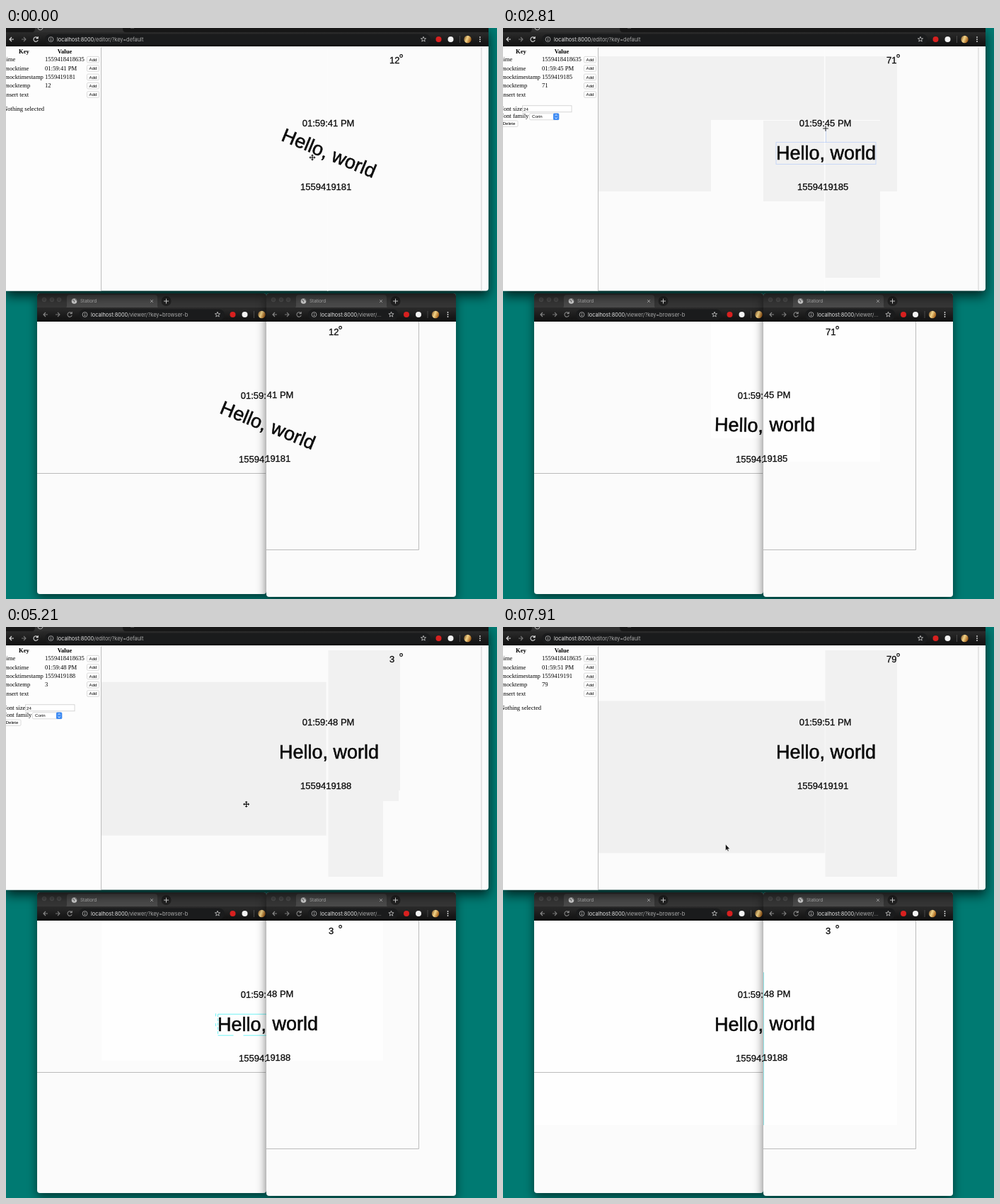
An HTML page that plays this animation: 694 by 807 pixels, repeating every 8 s.

```html
<!DOCTYPE html>
<html lang="en">
<head>
<meta charset="utf-8">
<title>Display editor</title>
<style>
  html, body { margin: 0; width: 100%; height: 100%; overflow: hidden; background: #007a72; }
  svg { display: block; width: 100%; height: 100%; }
  text { white-space: pre; }
  .ui { font-family: Inter, sans-serif; }
  .page { font: 8.6px "Liberation Serif", serif; }
  .head { font-weight: bold; text-anchor: middle; }
  .form { font: 6.1px "Liberation Sans", sans-serif; }
  .label, .title { font: 13px "Liberation Sans", sans-serif; fill: #0a0a0a; stroke: #0a0a0a; stroke-width: .3; }
  .title { font-size: 27px; text-anchor: middle; stroke-width: .55; }
  .window { filter: drop-shadow(0 5px 7px rgba(0, 0, 0, .55)); }
  .front { filter: drop-shadow(0 7px 8px rgba(0, 0, 0, .7)); }
  .icon { fill: none; stroke-width: 1.1; }
</style>
</head>
<body>
<svg id="stage" viewBox="0 0 694 807"></svg>
<script>
const LOOP = 8000;
const CENTER = { x: 456.5, y: 177 };
const BLUE = 'rgba(102,153,255,.5)';

// [first change, last change, number of changes]
const changes = [
  [0, 0, 1], [180, 1120, 7], [1270, 1270, 1], [1570, 2480, 7], [2660, 3100, 4],
  [3400, 3400, 1], [3700, 4170, 4], [4470, 5510, 8], [5650, 6100, 4],
  [6570, 6570, 1], [6870, 7610, 6], [7910, 7910, 1]
].flatMap(([from, to, n]) =>
  Array.from({ length: n }, (_, i) => n > 1 ? Math.round((from + (to - from) * i / (n - 1)) / 10) * 10 : from));

const cursorPath = [
  [0, 433, 183], [490, 433, 183], [960, 470, 144], [1270, 470, 144], [2180, 457.5, 142],
  [2660, 456, 142], [3400, 456, 142], [4170, 340, 202], [4620, 340, 202], [5510, 339.5, 275],
  [5650, 339.5, 275], [6570, 339.5, 277], [7610, 304, 345], [7910, 314.5, 307]
];
const titleAngle = [[0, 22.4], [1270, 22.4], [1570, 19.5], [1870, 11], [2180, 1.9], [2480, .5], [2660, 0]];
const screenTop = [[4620, 30], [5510, 102], [5650, 102], [5800, 104.5]];

// Left-over shading behind the editor canvas
const shading = [
  [0, ''],
  [340, 'M135 109.5H533V224H135Z'],
  [1870, 'M135 40H557V231H533V353H455V245H368V131H294V231H135Z'],
  [3100, 'M135 40H557V231H533V353H455V245H376V136H368V131H294V136H301V245H294V231H135Z'],
  [4470, 'M455.5 33H557V231H555V246H533V353H455.5Z'],
  [7160, 'M455.5 33H557V353H455.5Z']
];
const viewerShading = [[0, ''], [1870, 'M368 415H533V607H368Z'], [2660, 'M294 415H533V613H368V580H294Z'],
  [5060, 'M135 415H533V613H135Z'], [7160, 'M44 415H557V704H44Z']];
const editorData = [[0, 41, 12], [1870, 45, 71], [4470, 48, 3], [7160, 51, 79]];
const viewerData = [[0, 41, 12], [2660, 45, 71], [5060, 48, 3]];
const cursorKind = [[0, 'move'], [1270, 'plus'], [3700, 'move'], [7160, 'arrow']];

const held = (keys, t) => keys.filter(k => k[0] <= t).pop() || keys[0];

function tween(keys, t) {
  const next = keys.findIndex(k => k[0] > t);
  if (next < 0) return keys[keys.length - 1].slice(1);
  if (next === 0) return keys[0].slice(1);
  const a = keys[next - 1], b = keys[next], p = (t - a[0]) / (b[0] - a[0]);
  return a.slice(1).map((v, i) => v + (b[i + 1] - v) * p);
}

const rect = (x, y, w, h, fill, more = '') =>
  `<rect x="${x}" y="${y}" width="${w}" height="${h}" fill="${fill}" ${more}/>`;
const circle = (x, y, r, fill, more = '') => `<circle cx="${x}" cy="${y}" r="${r}" fill="${fill}" ${more}/>`;
const path = (d, stroke, more = '') => `<path d="${d}" fill="none" stroke="${stroke}" ${more}/>`;
const text = (x, y, str, cls, more = '') => `<text x="${x}" y="${y}" class="${cls}" ${more}>${str}</text>`;
const group = (x, y, body, angle = 0) => `<g transform="translate(${x} ${y}) rotate(${angle})">${body}</g>`;

// Address bar with its buttons; y is the middle line
function toolbar(x, y, navX, width, iconX, url, navColor, menu) {
  const arrow = (ax, dir, color) => path(`M${ax + 3 * dir} ${y}h${-6 * dir}m${3 * dir} -3l${-3 * dir} 3l${3 * dir} 3`, color, 'class="icon"');
  let star = '';
  for (let i = 0; i < 10; i++) {
    const r = i % 2 ? 1.6 : 3.8, a = i * Math.PI / 5;
    star += `${i ? 'L' : 'M'}${(iconX + r * Math.sin(a)).toFixed(2)} ${(y - r * Math.cos(a)).toFixed(2)}`;
  }
  return rect(x, y - 10, width, 20, 'url(#bar)')
    + rect(navX + 47, y - 7.5, iconX - navX - 37, 15, '#1a1b1c', 'rx="7.5"')
    + arrow(navX, 1, navColor) + arrow(navX + 17, -1, '#777')
    + path(`M${navX + 37} ${y - 1.5}a3.2 3.2 0 1 0 .2 2.6m0 -5.1v2.6h-2.6`, navColor, 'class="icon"')
    + circle(navX + 55.5, y, 3.4, 'none', 'stroke="#bbb" stroke-width=".8"')
    + path(`M${navX + 55.5} ${y - 2}v1m0 .8v2.2`, '#bbb', 'stroke-width=".9"')
    + text(navX + 64, y + 2.7, `<tspan fill="#e4e4e4">localhost:8000</tspan>${url}`, 'ui', 'font-size="7.4" fill="#aaa"')
    + path(star + 'Z', '#ccc', 'stroke-width=".8"')
    + circle(iconX + 21.5, y, 4, '#d8201f') + circle(iconX + 38.5, y, 4, '#f2f2f2')
    + path(`M${iconX + 51.5} ${y - 5}v10`, '#555', 'stroke-width=".8"')
    + circle(iconX + 62.5, y, 5.2, 'url(#photo)')
    + (menu ? [-3, 0, 3].map(d => circle(iconX + 80, y + d, .9, '#ddd')).join('') : '');
}

function outline(color, { handles = false, dash = '' } = {}) {
  const w = 70.5, h = 15.5;
  let out = rect(-w, -h, 2 * w, 2 * h, 'none', `stroke="${color}" stroke-dasharray="${dash}"`)
    + path(`M0 ${-h}V-35`, color);
  if (handles)
    for (const i of [-1, 0, 1]) for (const j of [-1, 0, 1])
      if (i || j) out += rect(i * w - 3.5, j * h - 3.5, 7, 7, 'none', `stroke="${color}"`);
  return out;
}

function canvasText([, second, temp], angle, frame = '') {
  return text(418.7, 138.5, `01:59:${second} PM`, 'label')
    + text(416, 229.2, 1559419140 + second, 'label')
    + text(542, 49.8, temp, 'label')
    + circle(558.6, 39.5, 1.9, 'none', 'stroke="#0a0a0a" stroke-width="1.1"')
    + group(CENTER.x, CENTER.y, text(0, 9, 'Hello, world', 'title') + frame, angle);
}

function viewer(t, isLeft) {
  const x = isLeft ? 44 : 368, w = isLeft ? 324 : 268, bottom = isLeft ? 800 : 804;
  const angle = t < 2660 ? 22.4 : isLeft && t < 3850 ? 1.6 : 0;
  let frame = '';
  if (t >= 1720 && t < 2660) frame = outline('#5cf0f4', { dash: '2 1' });
  else if (isLeft && t >= 4470 && t < 5800)
    frame = path('M-70 -15H0M-70 15H-48M-34 15H0', '#6ff2f4') + path('M-70 -15V15M-73 -16v5m0 9v5', '#6ff2f4', 'stroke-dasharray="4 2"');
  const tab = isLeft ? 0 : 324;
  const body = rect(x, 375, w, bottom - 375, '#fbfbfb')
    + rect(x, 375, w, 21, '#363636')
    + [54, 65, 75].map(c => circle(c + tab, 384, 2.8, '#444', 'stroke="#585858" stroke-width=".7"')).join('')
    + `<path d="M${83 + tab} 396q3 0 3 -4v-11q0 -4 4 -4h120q4 0 4 4v11q0 4 3 4z" fill="#4b4b4b"/>`
    + circle(96.5 + tab, 386, 3.8, '#d0d0d0')
    + path(`M${94 + tab} 384.5l2.5 1v2m1.5 -4.5l2 2.5`, '#666')
    + text(105 + tab, 388.4, 'Statiord', 'ui', 'font-size="6.3" fill="#b9b9b9"')
    + path(`M${204 + tab} 384l4 4m0 -4l-4 4`, '#bbb', 'stroke-width=".8"')
    + circle(226.5 + tab, 386, 7, '#222') + path(`M${223 + tab} 386h7m-3.5 -3.5v7`, '#ddd')
    + toolbar(x, 405, 56 + tab, w, isLeft ? 299 : 544.5, isLeft ? '/viewer/?key=browser-b' : '/viewer/...', '#888', !isLeft)
    + `<path d="${held(viewerShading, t)[1]}" fill="#fefefe"/>`
    + path(isLeft ? 'M44 629.5H367' : 'M583.5 415V737.5H368', '#b5b5b5', 'stroke-width=".9"')
    + (!isLeft && t >= 7310 ? path('M368.5 488V704', '#8fe3e6') : '')
    + group(isLeft ? -87 : -86, isLeft ? 385.2 : 384, canvasText(held(viewerData, t), angle, frame));
  return `<g class="window"><g clip-path="url(#${isLeft ? 'left' : 'right'})">${body}</g></g>`;
}

function sidePanel(t, [, second, temp]) {
  const rows = [['time', 1559418418635], ['mocktime', `01:59:${second} PM`],
    ['mocktimestamp', 1559419140 + second], ['mocktemp', temp], ['insert text', '']];
  const button = (x, y, w, label) => rect(x, y, w, 8.5, '#fff', 'rx="1.5" stroke="#ccc" stroke-width=".7"')
    + text(x + w / 2, y + 6.4, label, 'form', 'text-anchor="middle"');
  let out = rect(0, 26, 134, 346, '#fdfdfd')
    + text(25.5, 35.6, 'Key', 'page head') + text(83, 35.6, 'Value', 'page head');
  rows.forEach(([key, value], i) => {
    const y = 47.4 + i * 12.35;
    out += text(-2, y, key, 'page') + text(55, y, value, 'page') + button(114.5, y - 7, 17, 'Add');
  });
  if (t < 340 || t >= 7310) return out + text(-4, 117, 'Nothing selected', 'page');
  return out + text(-4, 117, 'Font size', 'page') + text(-4, 127.4, 'Font family', 'page')
    + rect(27.5, 109.8, 69.5, 9, '#fff', 'stroke="#ccc" stroke-width=".8"') + text(29, 116.6, '24', 'form')
    + rect(37.5, 120.8, 41.5, 9, '#fff', 'rx="1.5" stroke="#ccc" stroke-width=".7"') + text(41, 127.2, 'Corin', 'form')
    + rect(71, 120.6, 8.2, 9.4, '#3f8cf4', 'rx="1.5"')
    + path('M73.5 124.3l1.6 -1.8l1.6 1.8m0 2l-1.6 1.8l-1.6 -1.8', '#fff', 'stroke-width=".8"')
    + button(-4, 131, 25, 'Delete');
}

function cursor(t) {
  const [x, y] = tween(cursorPath, t);
  const shapes = {
    move: path('M-3 0H3M0 -3V3', '#fff', 'stroke-width="3"') + path('M-3 0H3M0 -3V3', '#111', 'stroke-width="1.2"')
      + '<path d="M-4.5 0l2 -2v4zM4.5 0l-2 -2v4zM0 -4.5l-2 2h4zM0 4.5l-2 -2h4z" fill="#111"/>',
    plus: path('M-3.8 0H3.8M0 -3.8V3.8', '#222'),
    arrow: '<path d="M0 0V9L2 7.2L3.4 10L4.7 9.4L3.4 6.7H6.2Z" fill="#111" stroke="#fff" stroke-width=".5"/>'
  };
  return group(x, y, shapes[held(cursorKind, t)[1]]);
}

function editor(t) {
  const data = held(editorData, t);
  let canvas = `<path d="${held(shading, t)[1]}" fill="#f1f1f1"/>`;
  if (t < 4470) {
    canvas += path('M454.7 27V372', '#fcfcfc', 'stroke-width="1.6"');
    if (t >= 1870) canvas += path('M294 130.5H533', '#fcfcfc');
  } else {
    const [top] = tween(screenTop, t), dragging = t > 4770 && t < 5800;
    const border = t < 4770 ? '#b9cbfa' : t < 7310 && !dragging ? '#d3ddf8' : 'none';
    canvas += rect(134, top, dragging ? 318.5 : 320.7, dragging ? 217 : 215, '#f0f0f0', `stroke="${border}"`);
  }
  let frame = '';
  if (t >= 340 && t < 4470) {
    const turning = t >= 1570 && t < 3400;
    frame = outline(turning ? 'rgba(102,153,255,.3)' : BLUE, { handles: !turning });
  }
  const body = rect(0, 0, 682, 372, '#fbfbfb')
    + toolbar(0, 16, 8, 682, 590, '/editor/?key=default', '#ddd', true)
    + rect(0, 0, 682, 6, '#171717') + '<path d="M37 6q4 0 4 -6H165q0 6 4 6z" fill="#303030"/>'
    + path('M45 0a3.6 3.6 0 0 0 7 0', '#bbb') + path('M176 0h5', '#777')
    + canvas + path('M672 27V372', '#cfcfcf')
    + sidePanel(t, data) + path('M134.5 27V372', '#bdbdbd')
    + canvasText(data, tween(titleAngle, t)[0], frame) + cursor(t);
  return `<g class="front"><g clip-path="url(#top)">${body}</g></g>`;
}

const clip = (id, x, y, w, h) => `<clipPath id="${id}">${rect(x, y, w, h, '#000', 'rx="4"')}</clipPath>`;
const defs = `<defs>
  <linearGradient id="bar" x2="0" y2="1"><stop stop-color="#2b2b2b"/><stop offset="1" stop-color="#0f0f0f"/></linearGradient>
  <linearGradient id="photo" x2="1" y2=".4"><stop stop-color="#6b3d12"/><stop offset=".5" stop-color="#f3d58a"/><stop offset="1" stop-color="#a8641c"/></linearGradient>
  ${clip('left', 44, 375, 324, 425)}${clip('right', 368, 375, 268, 429)}${clip('top', -9, -9, 691, 380.6)}
</defs>`;

const stage = document.getElementById('stage');
let shown = -1;

function render(now) {
  const time = now % LOOP;
  const t = changes.filter(c => c <= time).pop() || 0;
  if (t !== shown) {
    shown = t;
    stage.innerHTML = defs + rect(0, 0, 694, 807, '#007a72') + viewer(t, true) + viewer(t, false) + editor(t);
  }
  requestAnimationFrame(() => render(performance.now()));
}
render(performance.now());
</script>
</body>
</html>
```
